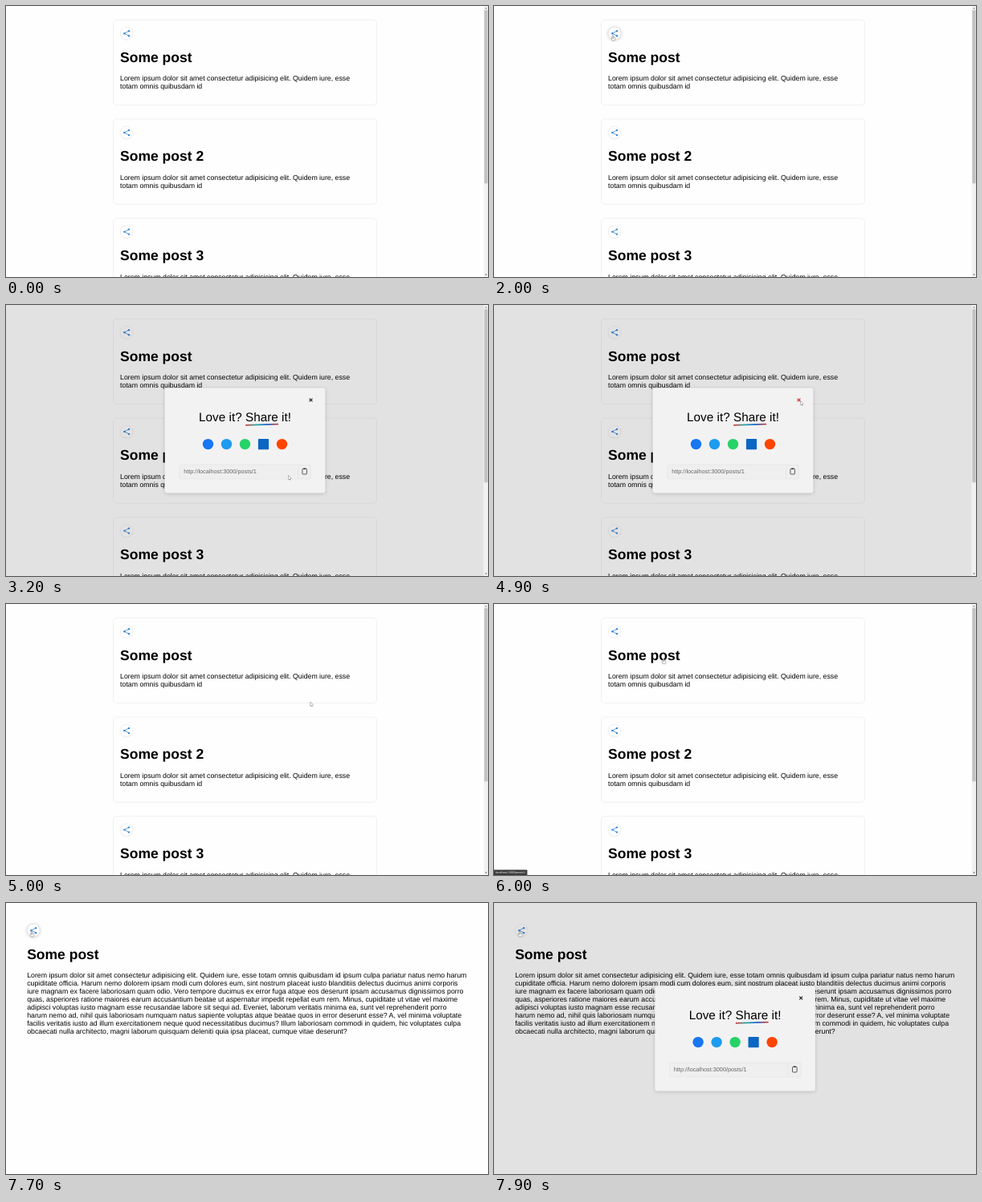
An HTML page with a canvas that plays this animation: 600 by 338 pixels, repeating every 8 s.

```html
<!DOCTYPE html>
<html lang="en">
<head>
<meta charset="utf-8">
<title>Share dialog</title>
<style>
html, body { margin: 0; width: 100%; height: 100%; overflow: hidden; background: #fefefe; }
canvas { display: block; width: 600px; height: 338px; }
</style>
</head>
<body>
<canvas id="stage"></canvas>
<script>
const W = 600, H = 338, LOOP = 8000;
const VIEW = 594.8;           // page width beside the scrollbar
const PITCH = 123.7;          // distance between cards
const NAV = 6300;             // the post page replaces the list
const FADE = 150;
const SANS = '"Liberation Sans", Arial, sans-serif';

const canvas = document.getElementById('stage');
const ctx = canvas.getContext('2d');
const dpr = window.devicePixelRatio || 1;
canvas.width = W * dpr;
canvas.height = H * dpr;

const DIALOGS = [{ from: 2150, to: 4960 }, { from: 7750, to: LOOP }];

// pointer moves: each eases to its goal, bulging sideways by bend
const ENTRY = { x: 383, y: 190 };
const MOVES = [
  { from: 700, to: 1500, x: 108, y: 46 },
  { from: 1500, to: 1900, x: 148, y: 36.5 },
  { from: 2600, to: 3200, x: 351.5, y: 212.5, bend: 100 },
  { from: 3200, to: 3500, x: 371, y: 208 },
  { from: 3600, to: 4000, x: 306, y: 214 },
  { from: 4100, to: 4800, x: 381.5, y: 119.5 },
  { from: 4950, to: 5800, x: 211, y: 68, bend: -100 },
  { from: 6350, to: 7000, x: 27, y: 51, bend: -90 },
  { from: 7000, to: 7700, x: 32, y: 35.5 }
];

const TEASER = [
  'Lorem ipsum dolor sit amet consectetur adipisicing elit. Quidem iure, esse',
  'totam omnis quibusdam id'
];
const ARTICLE = [
  'Lorem ipsum dolor sit amet consectetur adipisicing elit. Quidem iure, esse totam omnis quibusdam id ipsum culpa pariatur natus nemo harum',
  'cupiditate officia. Harum nemo dolorem ipsam modi cum dolores eum, sint nostrum placeat iusto blanditiis delectus ducimus animi corporis',
  'iure magnam ex facere laboriosam quam odio. Vero tempore ducimus ex error fuga atque eos deserunt ipsam accusamus dignissimos porro',
  'quas, asperiores ratione maiores earum accusantium beatae ut aspernatur impedit repellat eum rem. Minus, cupiditate ut vitae vel maxime',
  'adipisci voluptas iusto magnam esse recusandae labore sit sequi ad. Eveniet, laborum veritatis minima ea, sunt vel reprehenderit porro',
  'harum nemo ad, nihil quis laboriosam numquam natus sapiente voluptas atque beatae quos in error deserunt esse? A, vel minima voluptate',
  'facilis veritatis iusto ad illum exercitationem neque quod necessitatibus ducimus? Illum laboriosam commodi in quidem, hic voluptates culpa',
  'obcaecati nulla architecto, magni laborum quisquam deleniti quia ipsa placeat, cumque vitae deserunt?'
];

const clamp = k => Math.max(0, Math.min(1, k));
const ease = k => k * k * (3 - 2 * k);
const near = (p, x, y, r) => p !== null && Math.hypot(p.x - x, p.y - y) < r;

function pointerAt(t) {
  if (t < MOVES[0].from) return null;
  let a = ENTRY;
  for (const m of MOVES) {
    if (t < m.from) break;
    if (t < m.to) {
      const k = ease(clamp((t - m.from) / (m.to - m.from)));
      const dx = m.x - a.x, dy = m.y - a.y;
      const side = (m.bend || 0) * Math.sin(Math.PI * k) / Math.hypot(dx, dy);
      return { x: a.x + dx * k - dy * side, y: a.y + dy * k + dx * side };
    }
    a = m;
  }
  return a;
}

function text(str, x, y, size, color = '#000', weight = 400) {
  ctx.font = `${weight} ${size}px ${SANS}`;
  ctx.fillStyle = color;
  ctx.fillText(str, x, y);
}

function paint(fill, stroke, lineWidth) {
  if (fill) { ctx.fillStyle = fill; ctx.fill(); }
  if (stroke) { ctx.strokeStyle = stroke; ctx.lineWidth = lineWidth; ctx.stroke(); }
}

function rect(x, y, w, h, color) {
  ctx.fillStyle = color;
  ctx.fillRect(x, y, w, h);
}

function round(x, y, w, h, r, fill, stroke, lineWidth = 0.55) {
  ctx.beginPath();
  ctx.roundRect(x, y, w, h, r);
  paint(fill, stroke, lineWidth);
}

function disc(x, y, r, fill, stroke, lineWidth = 0.4) {
  ctx.beginPath();
  ctx.arc(x, y, r, 0, Math.PI * 2);
  paint(fill, stroke, lineWidth);
}

function line(x0, y0, x1, y1, color, width) {
  ctx.beginPath();
  ctx.moveTo(x0, y0);
  ctx.lineTo(x1, y1);
  paint(null, color, width);
}

function triangle(x, y, halfWidth, height, color) {
  ctx.beginPath();
  ctx.moveTo(x, y);
  ctx.lineTo(x - halfWidth, y + height);
  ctx.lineTo(x + halfWidth, y + height);
  paint(color);
}

function shadowed(alpha, blur, dy, draw) {
  ctx.save();
  ctx.shadowColor = `rgba(0,0,0,${alpha})`;
  ctx.shadowBlur = blur * dpr;
  ctx.shadowOffsetY = dy * dpr;
  draw();
  ctx.restore();
}

function shareButton(x, y, p) {
  const hover = near(p, x, y, 8);
  const blue = '#3a88d6';
  shadowed(hover ? 0.28 : 0.1, hover ? 4 : 2, 0.4, () => disc(x, y, 7.7, '#fefefe'));
  disc(x, y, 7.7, null, '#e6e6ea');
  disc(x - 2.8, y, 1.2, blue);
  for (const s of [-1, 1]) {
    line(x - 2.8, y, x + 2.9, y + 3 * s, blue, 0.8);
    disc(x + 2.9, y + 3 * s, 1.2, blue);
  }
}

function post(x, dy, title, lines, p) {
  shareButton(x + 8, 34.2 + dy, p);
  text(title, x, 69.6 + dy, 17.5, '#000', 700);
  lines.forEach((s, n) => text(s, x, 93.3 + dy + n * 10, 8.75));
}

function listPage(p) {
  for (let i = 0; i < 3; i++) {
    const dy = i * PITCH;
    round(133.6, 17.3 + dy, 327.9, 106.3, 4.4, '#fefefe', '#e3e3e5');
    post(142.1, dy, 'Some post' + (i ? ' ' + (i + 1) : ''), TEASER, p);
  }
}

function scrollbar() {
  rect(VIEW, 0, W - VIEW, H, '#f1f1f1');
  rect(595.4, 5.3, 4.1, 216, '#c1c1c1');
  triangle(597.5, 1.9, 1.3, 1.5, '#707070');
  triangle(597.5, 335.9, 1.3, -1.5, '#505050');
}

function clipboard(x, y) {
  round(x - 2.8, y - 3.1, 5.6, 6.7, 0.9, null, '#333', 0.8);
  round(x - 1.5, y - 3.9, 3, 1.6, 0.6, '#333');
}

function dialog(age, p, width) {
  const cx = width / 2 + 0.1, x = cx - 99.8;
  ctx.save();
  ctx.globalAlpha = clamp(age / FADE);
  rect(0, 0, width, H, 'rgba(12,0,12,0.11)');
  shadowed(0.16, 5, 1, () => round(x, 103.6, 199.6, 131, 3, '#f3f2f3'));

  const bx = x + 181.8, by = 118.5;
  const cross = near(p, bx, by, 4) ? '#d22020' : '#1c1c1c';
  for (const s of [-1.9, 1.9]) line(bx - s, by - 1.9, bx + s, by + 1.9, cross, 1.15);

  text('Love it? Share it!', x + 42.4, 145.4, 15.31);
  const left = x + 100.5, right = x + 141.3;
  const hues = ctx.createLinearGradient(left, 0, right, 0);
  ['#dc3a3a', '#1fa8a0', '#1b62d0', '#d8402f'].forEach((c, i) => hues.addColorStop(i / 3, c));
  line(left, 149.9, right, 148.6, hues, 1.6);

  ['#1877f2', '#1d9bf0', '#25d366', '#0a66c2', '#ff4500'].forEach((c, i) => {
    const ix = cx + (i - 2) * 23;
    if (i === 3) round(ix - 6.6, 167, 13.2, 13.2, 0.8, c);
    else disc(ix, 173.6, 6.7, c);
  });

  round(x + 18.2, 199, 163.4, 17.8, 1.6, '#f0eff0', '#e2e1e2');
  line(x + 165.9, 199, x + 165.9, 216.8, '#e2e1e2', 0.55);
  text('http://localhost:3000/posts/1', x + 23.5, 210.4, 7.29, '#666');
  clipboard(x + 174, 207.4);
  ctx.restore();
}

function statusBar() {
  round(-1, 331.4, 42.4, 8, 0.8, '#3b3b3d');
  text('localhost:3000/posts/1', 1.7, 336.2, 3.75, '#f2f2f2');
}

function hand(x, y) {
  round(x - 1.7, y + 2.4, 4.6, 4.2, 1.4, '#fff', '#666', 0.5);
  round(x - 0.7, y, 1.4, 4, 0.7, '#fff', '#666', 0.5);
}

function arrow(x, y) {
  ctx.beginPath();
  ctx.moveTo(x, y);
  ctx.lineTo(x, y + 5.3);
  ctx.lineTo(x + 3.8, y + 3.8);
  ctx.closePath();
  line.call(null, x + 1.5, y + 4, x + 2.5, y + 6, '#777', 1);
  ctx.beginPath();
  ctx.moveTo(x, y);
  ctx.lineTo(x, y + 5.3);
  ctx.lineTo(x + 3.8, y + 3.8);
  ctx.closePath();
  paint('#fff', '#777', 0.5);
}

function draw(t) {
  const p = pointerAt(t);
  const onPost = t >= NAV;
  const open = DIALOGS.find(d => t >= d.from && t < d.to);
  const under = open ? null : p;
  const overIcon = near(p, onPost ? 34.2 : 150.1, 34.2, 8);
  const overTitle = under && !onPost && p.x > 142 && p.x < 232 && p.y > 55 && p.y < 74;

  ctx.setTransform(dpr, 0, 0, dpr, 0, 0);
  ctx.textRendering = 'geometricPrecision';
  rect(0, 0, W, H, '#fefefe');
  if (onPost) post(26.2, 0, 'Some post', ARTICLE, under);
  else listPage(under);
  if (open) dialog(t - open.from, p, onPost ? W : VIEW);
  if (!onPost) scrollbar();
  if (overTitle && t > 5950) statusBar();
  if (p) (overIcon || overTitle ? hand : arrow)(p.x, p.y);
}

const start = performance.now();
function tick() {
  draw((performance.now() - start) % LOOP);
  requestAnimationFrame(tick);
}
tick();
</script>
</body>
</html>
```
